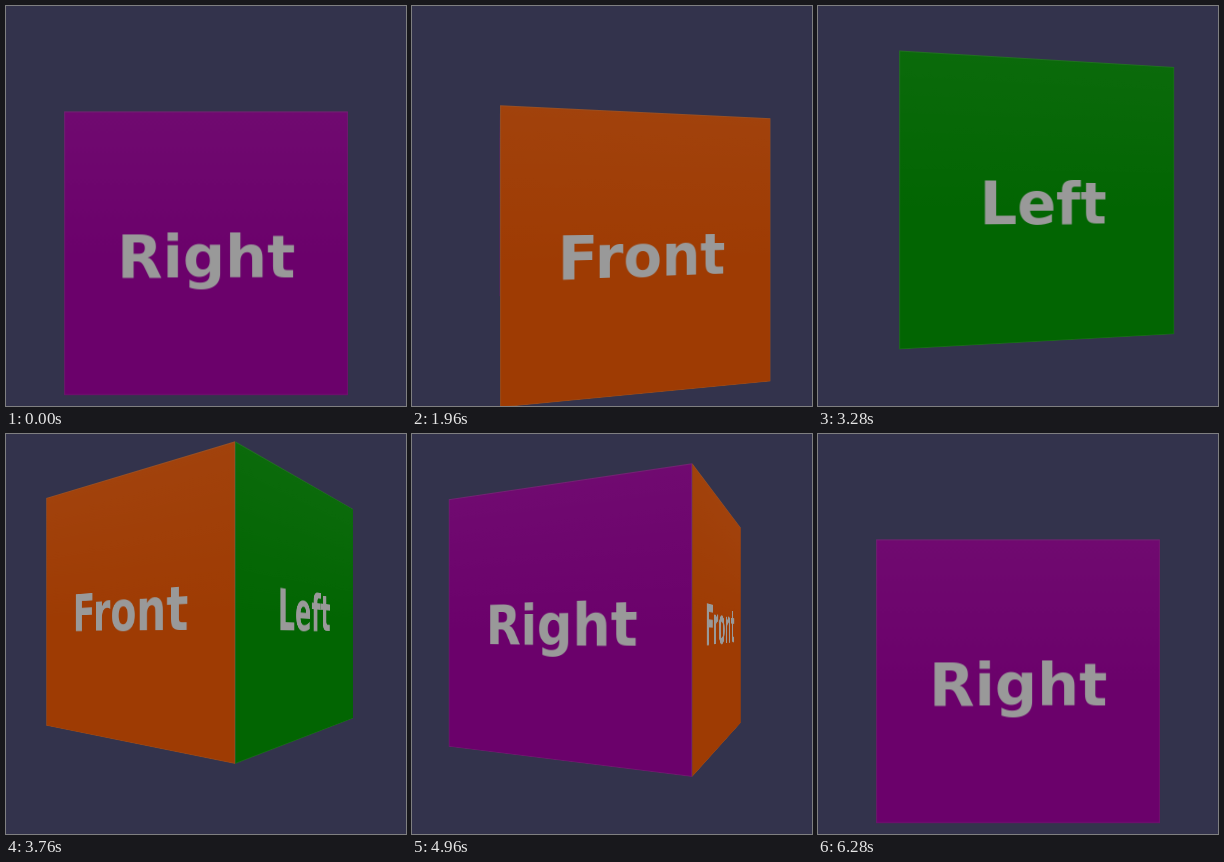
Animation, 400 px wide and 400 px high, one loop 6.32 s. Source, as an HTML page:

```html
<!DOCTYPE html>
<html lang="en">
<head>
<meta charset="utf-8">
<title>Turning cube</title>
<style>
  html, body { margin: 0; width: 100%; height: 100%; overflow: hidden; background: #33334c; }
  #stage {
    position: relative; width: 400px; height: 400px; overflow: hidden;
    perspective: 473px; perspective-origin: 200px 200px;
  }
  #cube, .face { position: absolute; width: 300px; height: 300px; }
  #cube { left: 50px; top: 50px; transform-style: preserve-3d; }
  .face {
    backface-visibility: hidden;
    background-image: linear-gradient(rgba(255, 255, 255, .035), rgba(255, 255, 255, 0) 55%);
    box-shadow: inset 0 0 0 1px rgba(120, 130, 120, .2);
    font: bold 62.4px/308px "DejaVu Sans", sans-serif;
    color: #999; text-align: center; white-space: nowrap; text-indent: .6px;
  }
  .right { background-color: #6b016b; transform: translateZ(150px); }
  .front { background-color: #9e3b03; transform: rotateY(90deg) translateZ(150px); }
  .left  { background-color: #026502; transform: rotateY(180deg) translateZ(150px); }
</style>
</head>
<body>
<div id="stage">
  <div id="cube">
    <div class="face right">Right</div>
    <div class="face front">Front</div>
    <div class="face left">Left</div>
  </div>
</div>
<script>
const LOOP = 6320, HOLD = 1080, STEP = 40;
const SWING = 52, TOTAL = 130, BOB_DELAY = 26; // in steps
const cube = document.getElementById("cube");

// 0 -> 1 -> 0, linear both ways, each way lasting SWING steps
const swing = s => Math.max(0, 1 - Math.abs(s / SWING - 1));

function draw(time) {
  const t = time % LOOP;
  const step = t < HOLD ? 0 : Math.min(TOTAL, Math.floor((t - HOLD) / STEP) + 0.12);
  const angle = -180 * swing(step);
  const y = 50 - 100 * swing(step - BOB_DELAY);
  cube.style.transform = `translate3d(0, ${y}px, -177px) rotateY(${angle}deg)`;
}

const start = performance.now();
function tick() {
  draw(performance.now() - start);
  requestAnimationFrame(tick);
}
tick();
</script>
</body>
</html>
```
